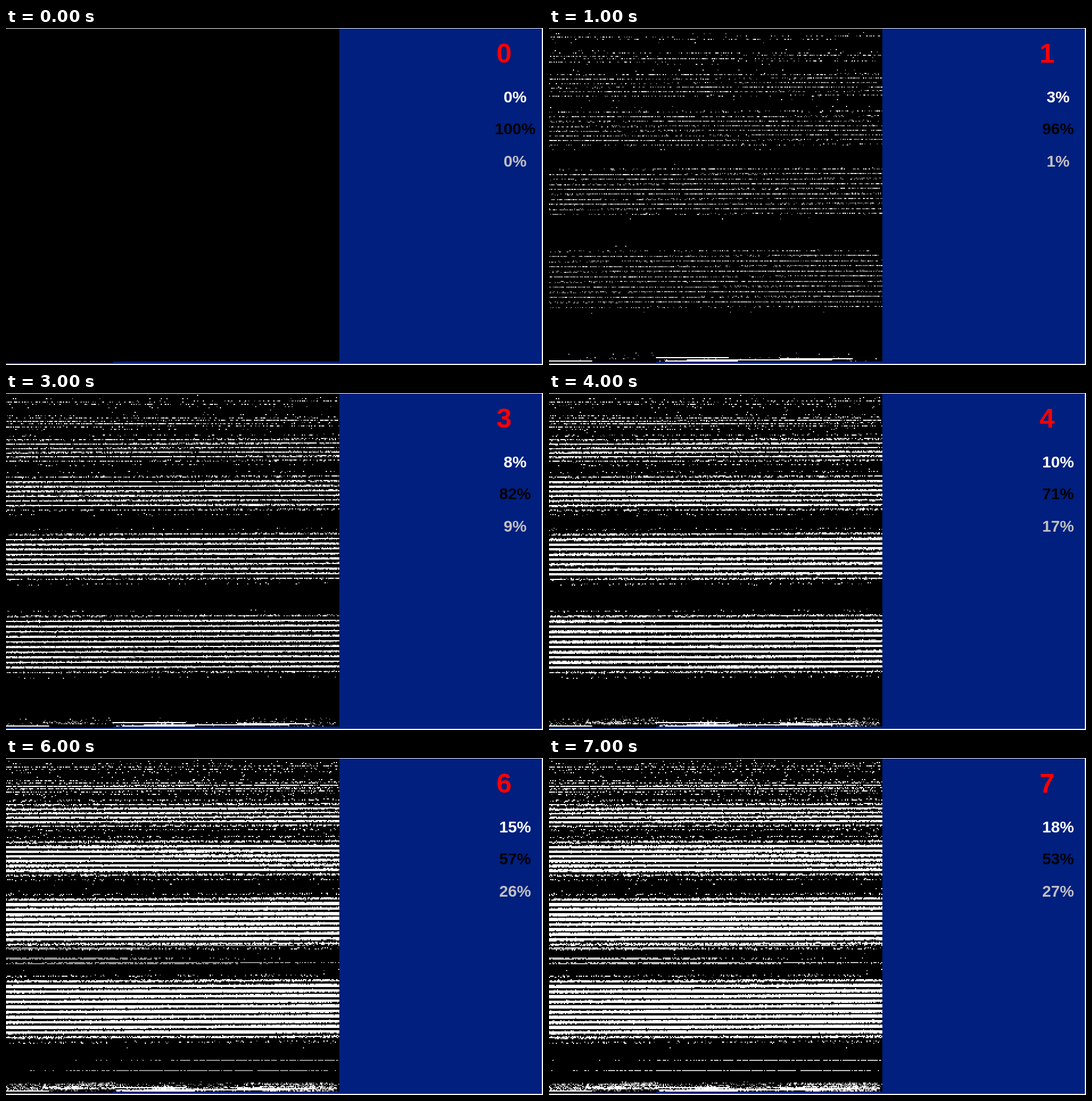
An HTML page with a canvas for the animation above (8000 ms loop, 944 px wide and 593 px high).

```html
<!DOCTYPE html>
<html lang="en">
<head>
<meta charset="utf-8">
<title>Memory fill</title>
<style>
  html, body { margin: 0; width: 100%; height: 100%; overflow: hidden; background: #fff; }
  canvas, svg { position: absolute; left: 0; top: 0; display: block; }
  text { font: bold 28px "Liberation Sans", Arial, sans-serif; text-anchor: middle; }
  #count { font-size: 48px; fill: #f00; }
</style>
</head>
<body>
<canvas id="stage" width="944" height="593"></canvas>
<svg width="944" height="593">
  <text id="count" x="875.5" y="61"></text>
  <text id="full" x="895" y="131" fill="#fff"></text>
  <text id="empty" x="895" y="187" fill="#000"></text>
  <text id="part" x="895" y="244" fill="#c0c0c0"></text>
</svg>
<script>
const N = 293, CELL = 2, SIZE = N * CELL, STEP = 1000;

// Counter readings, one per second; the rest is empty, less rounding loss.
const full = [0, 3, 6, 8, 10, 13, 15, 18];
const part = [0, 1, 5, 9, 17, 24, 26, 27];
const empty = t => 100 - full[t] - part[t] - Math.min(2, t >> 1);

// Each band holds two more lines than the one above, and is wider spaced.
const bands = [17.5, 51.3, 100.5, 176.5, 287.7, 441.7].map((centre, n) => ({
  centre,
  gap: Math.max(5, 10 - 5 / n),
  half: n + 0.5,
  power: Math.min(1, 0.2 + 0.2 * n),
  rough: 1.8 - 0.16 * n
}));
const sparse = [222, 331, 357, 540];

const clamp = (v, lo, hi) => Math.min(hi, Math.max(lo, v));

function hash(a, b, seed) {
  let h = Math.imul(a + 1, 374761393) ^ Math.imul(b + 7, 668265263) ^ Math.imul(seed, 2246822519);
  h = Math.imul(h ^ (h >>> 15), 2246822519);
  h = Math.imul(h ^ (h >>> 13), 3266489917);
  return ((h ^ (h >>> 16)) >>> 0) / 4294967296;
}

// Long-tailed noise per cell, plus streaks along the row.
function grain(col, row) {
  const u = 0.0005 + 0.999 * hash(col, row, 1);
  return Math.log(u / (1 - u)) + hash(row, 0, 2) + hash(col >> 4, row, 3) - 1;
}

function bandScore(y, level, noise) {
  let best = -9;
  for (const { centre, gap, half, power, rough } of bands) {
    const line = Math.round((y - centre) / gap - 0.5) + 0.5;
    const over = Math.max(0, Math.abs(line) - half + 1);
    if (over > 3) continue;
    const d = ((y - centre) / gap - line) * 9;
    const spread = rough * (0.35 + 0.05 * level) * (1 + 0.6 * over);
    best = Math.max(best, power * level / (1 + over) - 0.5 * over ** 3 - d * d + spread * noise);
  }
  return best;
}

// The end of the memory fills in patches.
function tailScore(x, row, y, level, noise) {
  if (y < 560) return -9;
  const core = Math.cos((x - 150) / 330 * Math.PI * 2);
  const streak = hash(x >> 6, row, 4) - 0.5;
  return level * 0.45 - 3 - ((y - 579) / 5) ** 2 + 0.6 * core + 0.7 * noise + 2.5 * streak;
}

function inStreak(x, col, row, y, age) {
  if (age < 1 || hash(row, 1, 5) > 0.5) return false;
  if (!sparse.some(c => Math.abs(y - c) < (c - 200) / 26)) return false;
  const mid = SIZE * hash(row, 2, 5), reach = 80 + 100 * hash(row, 3, 5);
  const out = Math.max(0, Math.abs(x - mid) - reach);
  return hash(col, row, 6) < 0.85 * Math.exp(-out / (12 + 35 * age));
}

function shade(col, row, t, level) {
  if (!t) return 0;
  const x = col * CELL, top = 1 + row * CELL;
  if (row > 288 && hash((x + 37 * row) >> 7, row, 7) < 0.35) return 255;

  // Addresses run on from one row into the next.
  const y = top + x / N, noise = grain(col, row);
  const s = Math.max(bandScore(y, level, noise), tailScore(x, row, top, level, noise));
  const v = s > 0 ? clamp(60 + s * 90, 0, 255) : 0;
  const age = t - 4;
  return inStreak(x, col, row, top + 1, age) ? Math.max(v, 45 + 50 * age) : v;
}

function memoryMap(t) {
  const map = document.createElement('canvas');
  map.width = map.height = N;
  const g = map.getContext('2d'), image = g.createImageData(N, N);
  const level = 0.19 * (100 - empty(t));
  for (let i = 0; i < N * N; i++) {
    const v = shade(i % N, Math.floor(i / N), t, level);
    image.data.set([v, v, v, 255], i * 4);
  }
  g.putImageData(image, 0, 0);
  return map;
}

const ctx = document.getElementById('stage').getContext('2d');
ctx.imageSmoothingEnabled = false;
ctx.fillStyle = '#001f7f';
ctx.fillRect(0, 1, 942, 590);
ctx.fillStyle = '#000';
ctx.fillRect(0, 1 + SIZE, 188, CELL);

const maps = full.map((_, t) => memoryMap(t));
const setText = (id, value) => { document.getElementById(id).textContent = value; };

function draw(t) {
  ctx.drawImage(maps[t], 0, 1, SIZE, SIZE);
  setText('count', t);
  setText('full', full[t] + '%');
  setText('empty', empty(t) + '%');
  setText('part', part[t] + '%');
}

let shown = -1;
const start = performance.now();
function tick() {
  const t = Math.floor((performance.now() - start) / STEP) % maps.length;
  if (t !== shown) draw(shown = t);
  requestAnimationFrame(tick);
}
tick();
</script>
</body>
</html>
```
